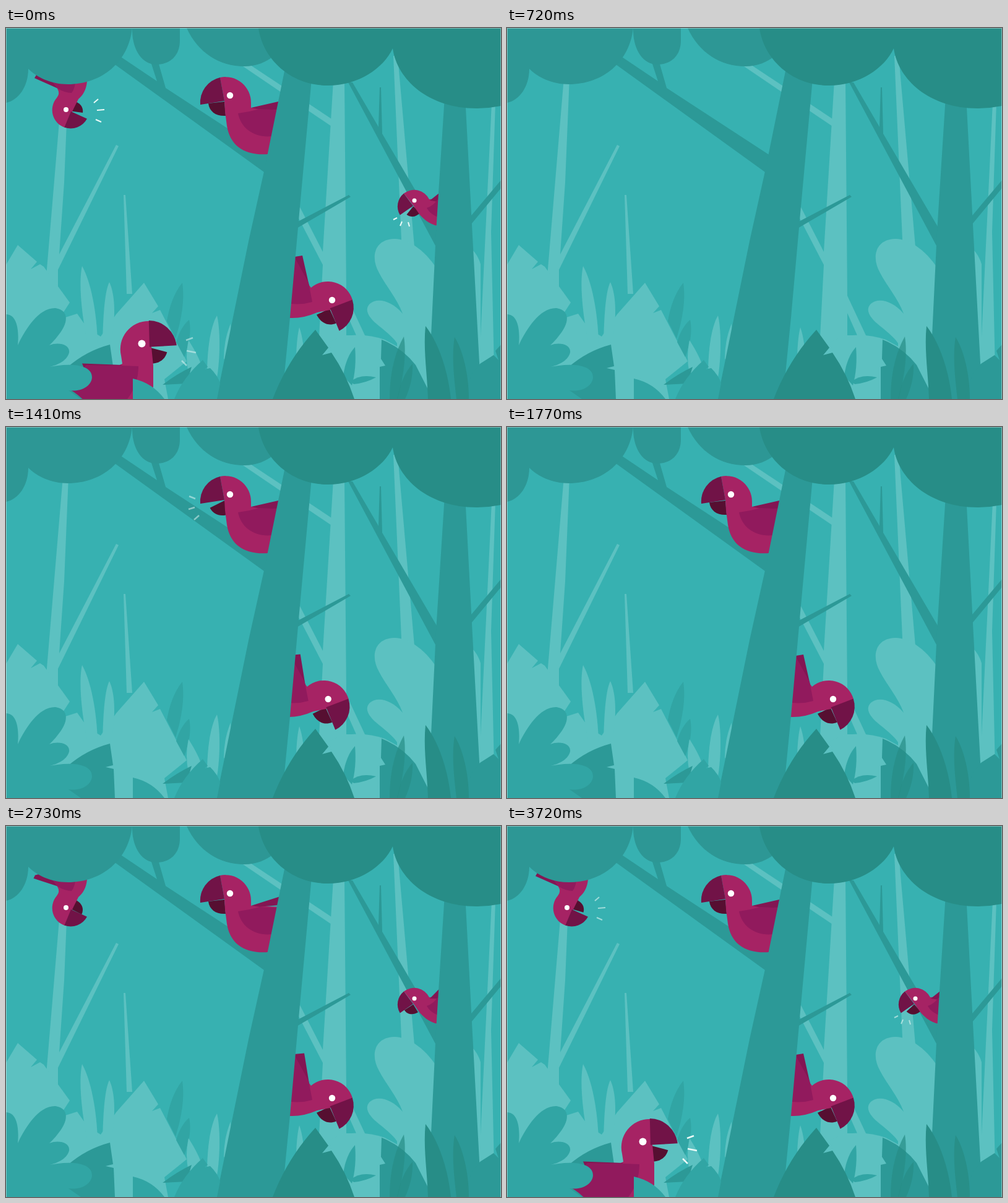
An HTML page that plays this animation: 800 px wide and 600 px high, repeating every 3.75 s.

```html
<!DOCTYPE html>
<html lang="en">
<head>
<meta charset="utf-8">
<title>Jungle parrots</title>
<style>
html, body { margin: 0; width: 100%; height: 100%; overflow: hidden; background: #37b1b1; }
svg { display: block; width: 100vw; height: 100vh; }
.pale { fill: #5cc1c1; }
.leaf { fill: #31a5a4; }
.mid { fill: #2c9997; }
.dark { fill: #278d87; }
.body { fill: #a62364; }
.wing { fill: #911a5d; }
.tail { fill: #831653; }
.beak { fill: #711347; }
.jaw { fill: #560f31; }
.call { fill: none; stroke: #eafaf7; stroke-linecap: butt; }
</style>
</head>
<body>
<svg viewBox="0 0 800 600" preserveAspectRatio="none">
  <defs>
    <clipPath id="clipB"><rect width="455" height="600"/></clipPath>
    <clipPath id="clipC"><rect x="450" width="350" height="600"/></clipPath>
    <clipPath id="clipD"><rect width="715" height="600"/></clipPath>
  </defs>
  <rect width="800" height="600" fill="#37b1b1"/>

  <!-- far trees -->
  <g class="pale">
    <path d="M92 80H101L94 250 86 366 178 189 182 191 84 391V420H63L66 390Z"/>
    <path d="M190 270H193L204 430H195Z"/>
    <path d="M529 85H547L550 433 580 497 600 600H500L506 500 512 383 470 302V280L512 362Z"/>
    <path d="M383 62 395 60 526 147V159Z"/>
    <path d="M626 45H633L661 365H640Z"/>
    <path d="M785 120H791L784 330 790 600H760L766 520Z"/>
    <path d="M750 355Q762 365 767 382V545H750Z"/>
  </g>
  <path d="M550 461V497H566Z" fill="#37b1b1"/>

  <!-- far bushes -->
  <g class="pale">
    <path d="M700 395C678 358 645 336 619 342C594 347 590 374 603 396C613 416 632 437 641 462C622 440 600 436 588 446C577 457 589 471 603 482C618 494 628 503 632 510V600H770V545H700Z"/>
    <path d="M500 600V545Q512 504 548 498Q580 493 612 504L660 530V600Z"/>
    <path d="M474 484Q480 500 482 530H469Q470 500 474 484Z"/>
    <path d="M0 383 19 351 50 378 40 390 55 382 61 386 103 444 92 461 96 468 115 462 132 486 153 499 178 463 223 412 246 450 236 461 249 456 292 539 256 568 262 600H0Z"/>
    <path d="M123 385C137 410 147 460 148 510H132C122 465 117 410 123 385Z"/>
    <path d="M167 411C176 430 178 465 170 510H156C157 460 160 425 167 411Z"/>
  </g>
  <g class="leaf">
    <path d="M285 412C289 440 284 470 274 502L260 474C264 450 272 428 285 412Z"/>
    <path d="M296 472C300 490 296 512 288 532L275 508C279 494 286 480 296 472Z"/>
  </g>
  <g class="pale">
    <path d="M341 465C347 490 347 545 337 585L325 552C326 510 332 480 341 465Z"/>
    <path d="M295 505Q308 525 315 543L295 560Q289 530 295 505Z"/>
    <path d="M363 478Q352 505 352 535L366 545Z"/>
  </g>
  <path class="mid" d="M168 512Q130 522 100 548V600H176L174 553 161 550 173 547Z"/>
  <path class="mid" d="M253 577Q275 560 300 548L292 575Z"/>

  <!-- branches -->
  <g class="mid">
    <path d="M186 47 244 86 234 55H246L258 97 425 206 417 233 176 59Z"/>
    <path d="M554 270 557 273 468 325V315Z"/>
    <path d="M553 88H560L602 160 604 96H606L608 171 700 328 695 354Z"/>
    <path d="M800 246V259L748 322V308Z"/>
  </g>

  <g id="A"></g>
  <g clip-path="url(#clipB)"><g id="B"></g></g>
  <g clip-path="url(#clipC)"><g id="C"></g></g>
  <g clip-path="url(#clipD)"><g id="D"></g></g>

  <!-- trunks -->
  <g class="mid">
    <path d="M452 60H496L474 300 459 468 446 600H340L392 345 417 232Z"/>
    <path d="M709 110H742L752 300 766 560 768 600H683L685 540 695 330Z"/>
  </g>

  <!-- canopy -->
  <g fill="#2d9795">
    <path d="M0 0H204C198 55 155 91 100 91C73 91 50 80 36 66C36 95 20 117 0 121Z"/>
    <path d="M204 0H281V20C281 45 265 59 243 59C220 59 205 36 204 6Z"/>
    <path d="M292 0C310 40 345 62 385 62C405 62 420 55 432 46L408 0Z"/>
  </g>
  <path class="dark" d="M408 0C415 50 460 93 520 93C570 93 610 65 625 33C632 84 684 130 760 130Q780 130 800 126V0Z"/>

  <g id="E"></g>

  <!-- undergrowth -->
  <g class="leaf">
    <path d="M0 463C15 463 22 482 19 513C30 490 52 452 80 453C104 457 99 479 86 495Q79 505 70 513C85 507 104 512 102 525C98 540 80 546 67 549C95 542 139 541 139 565C138 581 118 589 101 586L121 600H0Z"/>
    <path d="M205 567Q237 574 256 600H205Z"/>
    <path d="M318 537 326 548 321 552 330 550Q343 563 346 575L341 600H272Q286 565 318 537Z"/>
    <path d="M564 516C566 540 564 560 559 578L545 563C548 540 555 526 564 516Z"/>
    <path d="M598 565Q572 559 557 572L562 576Q582 574 598 565Z"/>
  </g>
  <path class="dark" d="M500 488 521 517 511 529 526 525Q550 560 563 600H431Q455 537 500 488Z"/>
  <g class="mid">
    <path d="M607 504Q640 517 662 545L690 600H604V548L613 546 606 535Z"/>
    <path d="M740 600 752 560 766 543 788 529 796 537 791 522 800 512V600Z"/>
  </g>
  <g class="dark">
    <path opacity=".7" d="M643 499C648 530 641 570 633 600H620C620 560 628 525 643 499Z"/>
    <path opacity=".7" d="M657 543C658 565 652 585 645 600H632C637 575 645 556 657 543Z"/>
    <path d="M678 482C697 506 714 550 719 600H682C681 560 674 520 678 482Z"/>
    <path opacity=".85" d="M725 500C738 520 748 560 748 600H728C724 565 720 530 725 500Z"/>
  </g>
  <path d="M.5 600V.5H799.5V600" fill="none" stroke="#fff" stroke-opacity=".4"/>
</svg>
<script>
const LOOP = 3750, STEP = 30, CUT = 600;

// head: x, y, turn, scale, mirror; hide: offset when out of sight
const birds = [
  { id: 'A', head: [105, 132.5, -147, .72, 1], eye: [97, 132, 4],
    body: 'M95 161A30 30 0 0 1 82 113Q88 106 83 98L75 80V50H140L131 86C130 100 124 109 117 115L108 133Z',
    wing: 'M70 80 82 97Q95 105 106 105 112 98 113 80Z',
    tail: 'M49 76 46 81 82 97 100 85 90 70Z', pivot: [82, 97], wag: -6,
    call: 'M142 121 149 115M147 133 159 132M145 148 154 152', line: 2,
    hide: [0, -95], enter: [2340, 2640], leave: [3900, 4095],
    calls: [2880, 3660], wags: [3480] },
  { id: 'B', head: [355, 121, 0, 1, 1], eye: [362, 109, 5.2],
    body: 'M346 80A41.5 41.5 0 0 1 396 121V129L450 131V204H424C385 207 362 190 357 158L354 135 353 118Z',
    wing: 'M375 138Q392 136 410 131L450 133V172L430 175C402 178 380 163 375 138Z',
    tail: 'M396 129 440 119 470 112V132H410Z', pivot: [396, 129], wag: -5,
    call: 'M306 116 296 112M305 130 295 133M312 143 304 150', line: 2.5,
    hide: [140, 0], enter: [720, 1080], leave: [3780, 4020],
    calls: [1260, 1860], wags: [1300, 2340, 2760] },
  { id: 'C', head: [520, 453, 59, 1, -1], eye: [527, 440, 5.2],
    body: 'M560 440A41.5 41.5 0 0 0 493 420L487 412 440 400V470L459 469Q480 470 503 460L528 455Z',
    wing: 'M455 370H466L489 412 495 443Q475 449 455 445Z',
    tail: 'M460 371 479 368 490 417 470 430Z', pivot: [490, 417], wag: 3.5,
    call: 'M545 500 550 509M531 500 530 514M517 490 510 499', line: 2.5,
    hide: [-120, 0], enter: [1260, 1500], leave: [3810, 4050],
    calls: [1500, 1980], wags: [1560, 2400, 2760] },
  { id: 'D', head: [660, 289, -26, .655, 1], eye: [660, 279, 3.5],
    body: 'M643 267.5A27 27 0 0 1 684 277L725 275V320H697C683 317 673 307 668 301L659 288Z',
    wing: 'M680 291Q690 288 697 278L725 270V309Q690 310 680 291Z',
    tail: 'M685 279 700 267 725 248V285Z', pivot: [685, 279], wag: -7,
    call: 'M626 310 632 307M637 320 640 313M650 314 652 321', line: 2,
    hide: [75, 0], enter: [1830, 2130], leave: [4020, 4290],
    calls: [2160, 2900, 3660], wags: [2750, 3450, 3560] },
  { id: 'E', head: [230.5, 519.5, -12, 1.11, -1], eye: [219.5, 510.5, 6],
    body: 'M231 474A45.5 45.5 0 0 0 186 530L188 543 150 560V610H232L238 580V546L235 516Z',
    wing: 'M90 577 130 545 188 546 214 547Q214 580 192 605H128Q118 592 90 577Z',
    tail: 'M123 542.5 188 545 172 552 130 560Z', pivot: [188, 545], wag: 0,
    call: 'M291 505 302 501M292 522 307 525M284 538 292 546', line: 2.5,
    hide: [-260, 41], enter: [2790, 3510], leave: [4110, 4290],
    calls: [3600], wags: [] }
];

const ramp = (t, a, b) => Math.min(1, Math.max(0, (t - a) / (b - a)));
const easeOut = x => 1 - (1 - x) ** 3;
const easeIn = x => x * x;

function build(b) {
  const g = document.getElementById(b.id);
  const [x, y, turn, s, m] = b.head;
  const place = `translate(${x} ${y}) rotate(${turn}) scale(${s * m} ${s})`;
  const [ex, ey, er] = b.eye;
  g.innerHTML = `
    <path class="tail" d="${b.tail}"/>
    <g transform="${place}"><path class="jaw" d="M-28 1C-26 15-15 22 0 21L-2-2Z"/></g>
    <path class="body" d="${b.body}"/>
    <path class="wing" d="${b.wing}"/>
    <g transform="${place}"><path class="beak" d="M-9-41A41.5 41.5 0 0 0-41 3L-2-3Z"/></g>
    <circle cx="${ex}" cy="${ey}" r="${er}" fill="#fff"/>
    <path class="call" d="${b.call}" stroke-width="${b.line}"/>`;
  const part = name => g.querySelector('.' + name);
  // the tail lies over the body, except where the wing covers it
  g.insertBefore(part('tail'), part('wing'));
  Object.assign(b, { g, tailEl: part('tail'), jawEl: part('jaw'), callEl: part('call') });
}

function pose(b, t) {
  const away = 1 - easeOut(ramp(t, ...b.enter)) + easeIn(ramp(t, ...b.leave));
  b.g.style.display = away >= 1 ? 'none' : '';
  b.g.setAttribute('transform', `translate(${b.hide[0] * away} ${b.hide[1] * away})`);

  let open = 0, glow = 0;
  for (const s of b.calls) {
    const u = t - s;
    open += ramp(u, 25, 95) - ramp(u, 180, 270);
    glow += ramp(u, 25, 85) - ramp(u, 120, 180);
  }
  b.jawEl.setAttribute('transform', `rotate(${-20 * open} -2 -2)`);
  b.callEl.setAttribute('opacity', glow);

  // each entry swaps the tail between raised and lowered
  const low = b.wags.reduce((k, s, i) => k + (i % 2 ? -1 : 1) * ramp(t, s, s + 90), 0);
  b.tailEl.setAttribute('transform', `rotate(${b.wag * (1 - low)} ${b.pivot})`);
}

function draw(ms) {
  const t = Math.floor((ms % LOOP) / STEP) * STEP;
  const u = t < CUT ? t + LOOP : t;
  birds.forEach(b => pose(b, u));
}

birds.forEach(build);
const start = performance.now();
function tick() {
  draw(performance.now() - start);
  requestAnimationFrame(tick);
}
tick();
</script>
</body>
</html>
```
